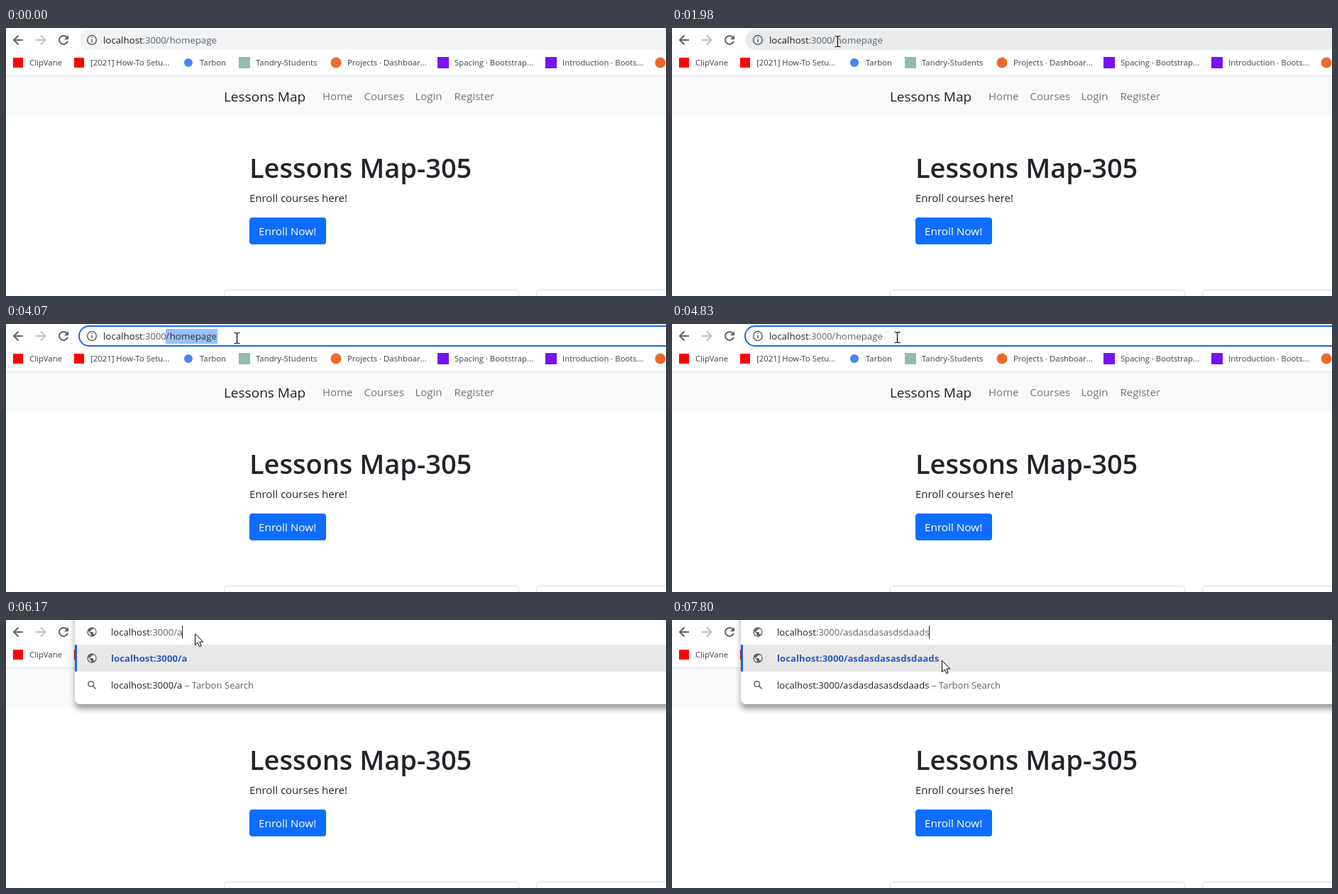
Write an HTML page that moves like this. It is 930 px wide and 379 px high and loops after 8000 ms.

```html
<!DOCTYPE html>
<html lang="en">
<head>
<meta charset="utf-8">
<title>Address bar demo</title>
<style>
  html, body { margin: 0; width: 100%; height: 100%; overflow: hidden; background: #fff; }
  svg { display: block; width: 930px; height: 379px; font-family: "Open Sans", "Noto Sans", sans-serif; }
  text { white-space: pre; }
  .mark { font-size: 11.35px; fill: #3c4043; }
  .url { font-size: 13.3px; fill: #5f6368; }
  .entry { font-size: 13.1px; fill: #5f6368; }
  .dark { fill: #202124; }
  .link { font-size: 15px; fill: #747576; }
  .shade { filter: drop-shadow(0 7px 4.5px rgba(0, 0, 0, .36)); }
</style>
</head>
<body>
<svg id="stage" viewBox="0 0 930 379" xmlns="http://www.w3.org/2000/svg"></svg>
<script>
const LOOP = 8000;
const HOST = "localhost";
const TYPED = "asdasdasasdsdaads";

const text = (x, y, cls, str, extra = "") => `<text x="${x}" y="${y}" class="${cls}" ${extra}>${str}</text>`;
const rect = (x, y, w, h, fill, extra = "") =>
  `<rect x="${x}" y="${y}" width="${w}" height="${h}" fill="${fill}" ${extra}/>`;
const dot = (x, y, r, fill) => `<circle cx="${x}" cy="${y}" r="${r}" fill="${fill}"/>`;
const line = (d, color, width) => `<path d="${d}" fill="none" stroke="${color}" stroke-width="${width}"/>`;

const globe = (x, y) => `<g transform="translate(${x} ${y})">${dot(0, 0, 6.7, "#5f6368")}
  <path d="M-5.2 -1.2L-2 2V3Q-2 4.2 -.7 4.2V5.4Q-5.6 4.4 -5.2 -1.2Z
  M2 -4.9Q5.4 -3.5 5.4 0Q5.4 2.2 4 3.6Q3.6 2.7 2 2.7V.7L1.3 0H-2.7V-1.4H-1.3L-.7 -2V-3.4H.7Q2 -3.4 2 -4.9Z" fill="#fff"/></g>`;

const navIcons = `
  ${line("M24 17H11.5M17.5 10.5L11 17L17.5 23.5", "#5f6368", 2)}
  ${line("M42 17H55M49 10.5L55.5 17L49 23.5", "#bdc1c6", 2)}
  ${line("M85.6 13A6 6 0 1 0 86.8 18.6", "#5f6368", 2)}
  <path d="M88 10V16.2H81.8Z" fill="#5f6368"/>`;

const infoIcon = `${line("M114.6 17a6.4 6.4 0 1 0 12.8 0a6.4 6.4 0 1 0 -12.8 0M121 16V20.6M121 13V14.6", "#5f6368", 1.5)}`;

const bookmarks = [
  [33, "ClipVane"], [119, "[2021] How-To Setu..."], [273, "Tarbon"], [352, "Tandry-Students"],
  [481, "Projects · Dashboar..."], [632, "Spacing · Bootstrap..."], [784, "Introduction · Boots..."]
].map(([x, s]) => text(x, 53, "mark", s)).join("");

const badges =
  [10, 96].map(x => rect(x, 42, 14, 14, "#f00")).join("") +
  dot(257, 49, 6, "#4285f4") + rect(328, 41, 16, 16, "#8fbdb2") +
  [465, 922].map(x => dot(x, 49, 7.5, "#ee6a2c")).join("") +
  [608, 760].map(x => rect(x, 41, 16, 16, "#7613f3")).join("");

const links = [[446, "Home"], [504.5, "Courses"], [576.5, "Login"], [631.5, "Register"]]
  .map(([x, s]) => text(x, 102, "link", s)).join("");

const card = x => rect(x + .5, 370.5, 415, 60, "#fff", 'rx="4" stroke="#dcdcdc"');

const page = `
  ${rect(0, 0, 930, 379, "#fff")}
  ${rect(0, 67, 930, 1, "#dcdee1")}
  ${rect(0, 68, 930, 56, "#f8f9fb")}
  ${text(307, 104, "dark", "Lessons Map", 'font-size="19"')}
  ${links}
  ${text(343, 212, "", "Lessons Map-305", 'font-size="38" font-weight="600" fill="#212529"')}
  ${text(343, 246, "", "Enroll courses here!", 'font-size="15" fill="#212529"')}
  ${rect(343, 268, 108, 38, "#0d6efd", 'rx="4"')}
  ${text(356, 293, "", "Enroll Now!", 'font-size="15.3" fill="#fff"')}
  ${card(307)}${card(747)}`;

const toolbar = `
  ${navIcons}
  <rect id="pill" x="103" y="3" width="900" height="28" rx="14"/>
  ${rect(225, 7, 0, 21, "#99c2f8", 'id="pick"')}
  ${infoIcon}
  ${text(137, 22, "url dark", HOST)}
  ${text(192.6, 22, "url", ":3000", 'style="font-size:13px"')}
  ${text(225, 22, "url", "/", 'id="slash"')}
  ${text(230.7, 22, "url", "homepage", 'id="tail"')}
  ${badges}${bookmarks}`;

const popup = `<g id="popup">
  ${rect(97, -30, 900, 149, "#fff", 'rx="7" class="shade"')}
  ${rect(97, 35, 833, 38, "#e8e8e8")}
  ${rect(97, 35, 3, 38, "#1b66d2", 'rx="1"')}
  ${globe(121, 17)}${globe(121, 54)}
  ${line("M115.9 90.5a3.8 3.8 0 1 0 7.6 0a3.8 3.8 0 1 0 -7.6 0M122.5 93.3L126.7 97.5", "#5f6368", 1.6)}
  ${text(148, 22, "entry", `<tspan class="dark">${HOST}</tspan>:3000/<tspan class="typed"></tspan>`, 'id="entry"')}
  ${rect(298, 8, 1, 18, "#202124", 'id="caret"')}
  ${text(148, 59, "", `${HOST}:3000/<tspan class="typed"></tspan>`, 'font-size="13.2" font-weight="700" fill="#2a5dbe"')}
  ${text(148, 97, "entry", `<tspan class="dark">${HOST}:3000/<tspan class="typed"></tspan></tspan> – Tarbon Search`)}
</g>`;

const beamPath = "M-3.5 -7.5H-1L.5 -6.5L2 -7.5H4.5M.5 -6.5V6.5M-3.5 7.5H-1L.5 6.5L2 7.5H4.5";
const cursors = `
  <g id="beam">${line(beamPath, "#fff", 2.6)}${line(beamPath, "#000", 1.2)}</g>
  <path id="arrow" d="M.5 .5V16.5L4.2 13L6.7 18.6L9.2 17.5L6.8 12H11.8Z" fill="#fff" stroke="#000"/>`;

document.getElementById("stage").innerHTML = page + toolbar + popup + cursors;

const el = id => document.getElementById(id);
const [pill, pick, slash, tail, pop, entry, caret, beam, arrow] =
  ["pill", "pick", "slash", "tail", "popup", "entry", "caret", "beam", "arrow"].map(el);
const typedSpans = document.querySelectorAll(".typed");

// start, end, steps, pointer shape, waypoints
const moves = [
  [260, 330, 2, "arrow", [[816, 364], [808, 350]]],
  [530, 1300, 12, "arrow", [[690, 296], [290, 100], [96, 35]]],
  [1370, 1640, 5, "beam", [[187, 30], [248, 14], [293, 12], [260, 17], [232, 19]]],
  [1840, 1980, 3, "beam", [[234, 19], [233, 20], [233, 19]]],
  [2840, 3330, 8, "beam", [[252, 19], [228, 19]]],
  [3530, 3810, 5, "beam", [[228, 19], [246, 19], [275, 19], [305, 20], [328, 20]]],
  [4070, 4070, 1, "beam", [[325, 20]]],
  [4146, 4830, 10, "beam", [[331, 25], [303, 20], [285, 18], [300, 18], [317, 19]]],
  [4900, 5040, 3, "beam", [[295, 18], [255, 19], [226, 20]]],
  [5300, 5570, 4, "arrow", [[234, 20], [246, 20], [257, 19], [264, 18]]],
  [6170, 6845, 10, "arrow", [[272, 24], [308, 44]]],
  [6990, 7200, 4, "arrow", [[377, 56]]],
  [7600, 7800, 3, "arrow", [[380, 57]]]
];

const keys = [[7340, 10], [7410, 11], [7600, 13], [7700, 15], [7800, 17]];
const clamp = (v, lo, hi) => Math.max(lo, Math.min(hi, v));

function pointerAt(t) {
  const n = moves.findLastIndex(m => t >= m[0]);
  if (n < 0) return null;
  const [start, end, steps, shape, points] = moves[n];
  const from = n ? moves[n - 1][4].at(-1) : [824, 378];
  const gap = (end - start) / Math.max(1, steps - 1) || 1;
  const step = Math.min(steps - 1, Math.floor((t - start) / gap + 1e-6));
  const path = [from, ...points];
  const pos = (step + 1) / steps * points.length;
  const i = Math.min(points.length - 1, Math.floor(pos + 1e-6));
  const mix = k => path[i][k] + (path[i + 1][k] - path[i][k]) * (pos - i);
  return { shape, x: Math.round(mix(0)), y: Math.round(mix(1)) };
}

function selectionAt(t, x) {
  if (t >= 3530 && t < 4400) return [225, t < 3810 ? clamp(x, 225, 298) : 298];
  if (t >= 4900) return [t < 5040 ? clamp(x, 231, 298) : 231, 298];
  return [225, 225];
}

function typedAt(t) {
  if (t < 6170) return 0;
  const key = keys.findLast(k => t >= k[0]);
  return key ? key[1] : Math.min(8, Math.floor((t - 6170) / 75) + 1);
}

function set(node, attrs) {
  for (const k in attrs) node.setAttribute(k, attrs[k]);
}

function draw(t) {
  const p = pointerAt(t);
  for (const [name, node] of [["beam", beam], ["arrow", arrow]]) {
    const on = p && p.shape === name;
    node.style.display = on ? "" : "none";
    if (on) set(node, { transform: `translate(${p.x} ${p.y})` });
  }

  set(pill, t >= 3530
    ? { fill: "#fff", stroke: "#1b6ae0", "stroke-width": 2 }
    : { fill: t >= 1440 ? "#e9ebec" : "#f1f3f4", stroke: "none" });

  const [a, b] = selectionAt(t, p ? p.x : 0);
  set(pick, { x: a, width: b - a });
  slash.style.fill = b > a && a < 231 ? "#30363f" : "";
  tail.style.fill = b - a > 60 ? "#30363f" : "";

  const count = typedAt(t);
  pop.style.display = count ? "" : "none";
  if (count) {
    const word = TYPED.slice(0, count);
    typedSpans.forEach(s => { if (s.textContent !== word) s.textContent = word; });
    set(caret, { x: Math.round(148 + entry.getComputedTextLength()) });
  }
}

function tick() {
  draw(performance.now() % LOOP);
  requestAnimationFrame(tick);
}
tick();
</script>
</body>
</html>
```
